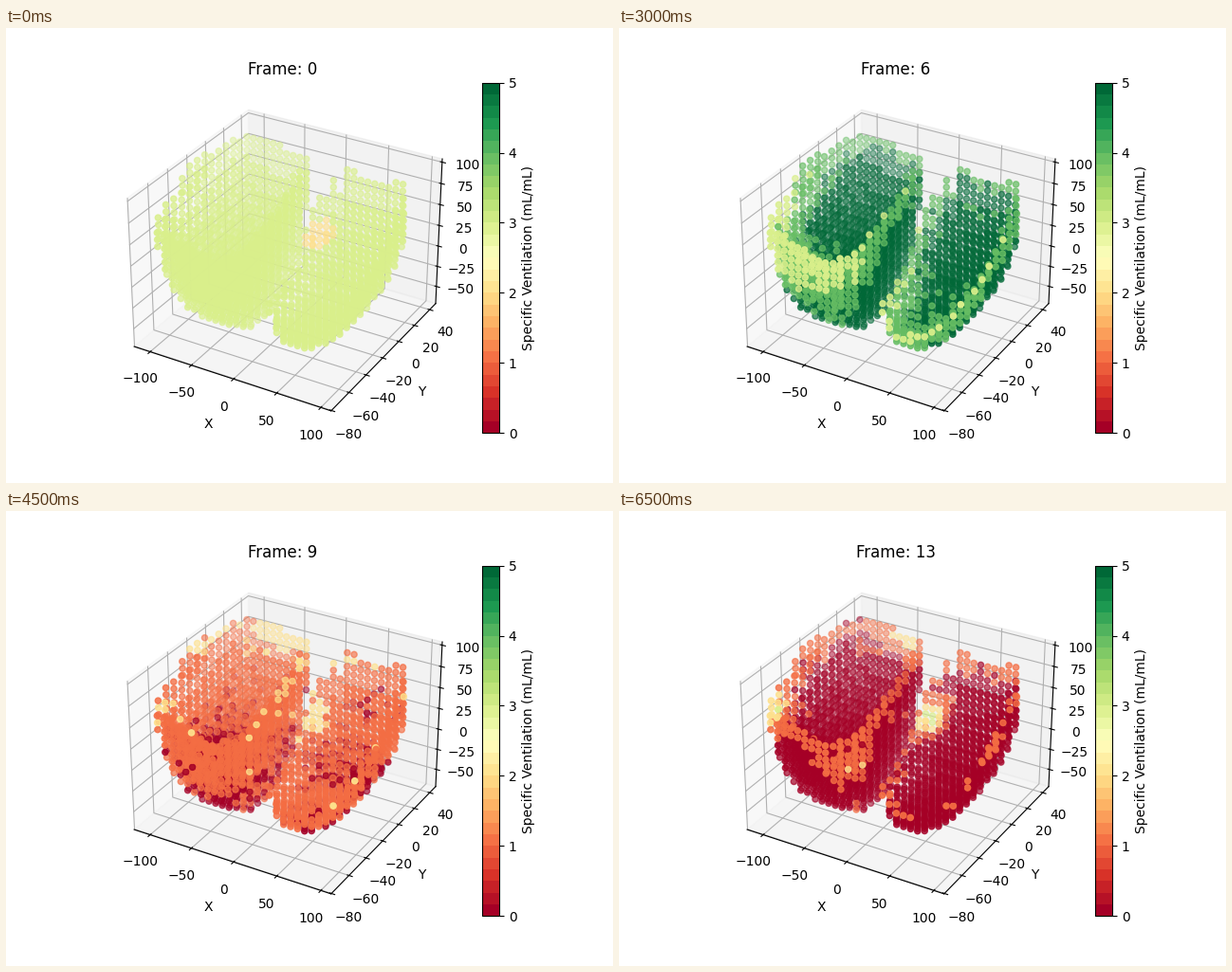
Write a matplotlib script that moves like this. It is 640x480 px and loops after 7 s.

```python
import numpy as np
import matplotlib.pyplot as plt
from matplotlib.animation import FuncAnimation
from matplotlib.cm import ScalarMappable
from matplotlib.colors import Normalize

FRAMES, INTERVAL = 14, 500
STEP = 8.05
CMAP = plt.get_cmap("RdYlGn")
rng = np.random.default_rng(7)


def lung(side):
    """Voxels of one lung, apex down, with a hollow base on top."""
    x, y, z = np.meshgrid(np.arange(-114.9, 107, STEP),
                          np.arange(-77.7, 46, STEP),
                          np.arange(-68, 102, STEP), indexing="ij")
    shrink = np.sqrt(np.clip(1 - (np.clip(70 - z, 0, None) / 136) ** 2.3,
                             0.01, 1))
    cx = 53 if side > 0 else -62

    def radius(s):
        out = side * (x - cx) + 20 * (1 - s)      # + is lateral
        dy = y + 16 + 13 * (1 - s)                # + is towards the back
        half_x = np.where(out > 0, 53 * s, 49 * np.sqrt(s))
        half_y = np.where(dy > 0, 50, 60) * s
        n = np.where((side > 0) & (dy < 0), 2.4, 3.5)
        return ((np.abs(out) / half_x) ** n
                + (np.abs(dy) / half_y) ** n) ** (1 / n)

    inward = side * (cx - x) / 50
    back = (y + 16) / 57
    if side > 0:
        notch = 30 * np.clip(inward, 0, 1) * np.exp(-((back + 0.2) / 0.4) ** 2)
        rim, hollow = 44 + 56 * back - notch, 45
    else:
        rim, hollow = 80 + 26 * back - 16 * inward, 55
    rim = np.minimum(rim, 101)
    dip = np.clip(1 - (radius(np.ones_like(z)) / 0.88) ** 3, 0, 1)
    keep = (radius(shrink) <= 1) & (z <= rim - hollow * dip)
    under = np.clip((rim - z) / 70, 0, 1.5)
    cols = (x, y, z, under, back, np.full_like(x, side))
    return np.array([c[keep] for c in cols])


def blob(x, y, z, r):
    d2 = (xyz[0] - x) ** 2 + (xyz[1] - y) ** 2 + (xyz[2] - z) ** 2
    return np.exp(-d2 / (r * r))


pts = np.hstack([lung(-1), lung(1)])
xyz, (under, back, side) = pts[:3], pts[3:]
right = side > 0
deep = np.clip(under * (1 + 0.55 * back), 0, 1.5)
wave = (np.sin(xyz[0] / 13 + 1) * np.sin(xyz[1] / 11)
        + np.sin(xyz[2] / 12 + xyz[1] / 17))
noise = rng.normal(0, 0.8, deep.size) + 0.5 * wave

medial = blob(12, 4, 25, 16)
outer = blob(92, 18, 35, 13)
# Places that empty late: middle, front edges and back corner
trapped = (2.8 * medial + 1.8 * blob(-25, -50, 5, 20)
           + 2 * blob(-105, -66, 58, 18) + 1.6 * blob(80, -20, 35, 15)
           + 4 * blob(-22, -44, -48, 9) + 2 * blob(-42, 32, 90, 15))


def ramp(i, a, b):
    return np.clip((i - a) / (b - a), 0, 1)


def blend(a, b, t):
    return a + (b - a) * t


def ventilation(i):
    fill = ramp(i, 0, 6)
    full = 3 + fill * (0.4 + 2 * deep + 0.5 * back)
    rest = 1.5 + np.where(right, 0.25 * deep - 0.3, 0.5 * back)
    empty = 1.5 - 0.1 * (i - 8) - 1.5 * under - 0.2 * right
    v = blend(blend(full, rest, ramp(i, 6, 8)), empty, ramp(i, 8, 10))
    v = v + 0.25 * fill * noise + ramp(i, 7, 12) * trapped
    v = v - (1 - ramp(i, 0, 2)) * (medial > 0.4)
    v = v + np.clip(1 - abs(i - 2) / 2, 0, 1) * (outer > 0.4)
    return np.clip(np.rint(v), 0, 5)


fig = plt.figure(figsize=(6.4, 4.8), dpi=100)
ax = fig.add_subplot(projection="3d")
fig.colorbar(ScalarMappable(Normalize(0, 5), CMAP.resampled(30)), ax=ax,
             label="Specific Ventilation (mL/mL)")
ax.set(xlim=(-119.7, 111.4), ylim=(-80.4, 48), zlim=(-71.5, 103.8),
       xlabel="X", ylabel="Y")


def update(i):
    for old in list(ax.collections):
        old.remove()
    ax.scatter(*xyz, c=CMAP(ventilation(i) / 5))
    ax.set_title(f"Frame: {i}")
    return []


anim = FuncAnimation(fig, update, frames=FRAMES, interval=INTERVAL,
                     repeat=True, repeat_delay=0)
plt.show()
```
